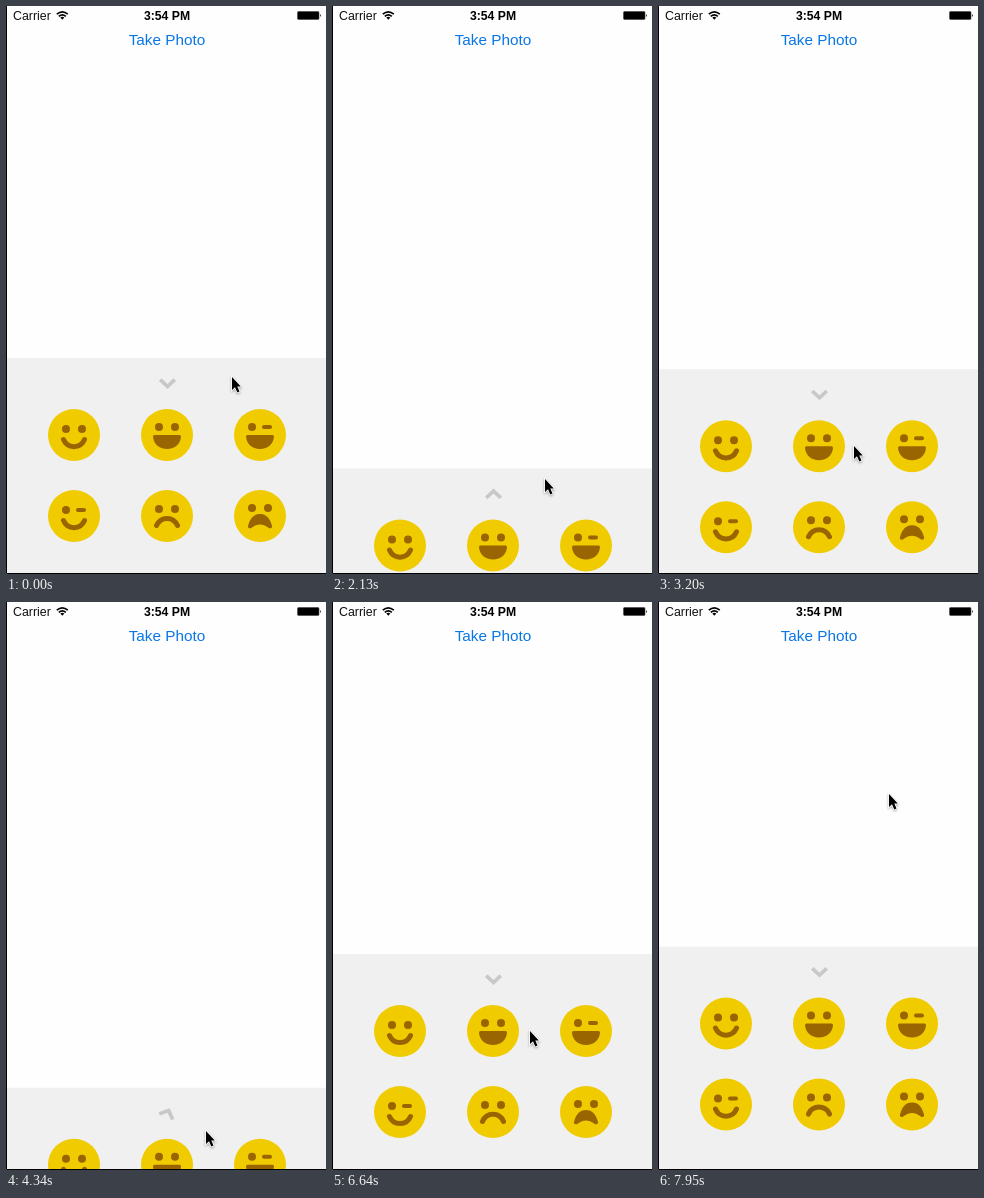
These frames come from a looping animation (320 by 568 pixels, 8 s). An HTML page:

```html
<!DOCTYPE html>
<html lang="en">
<head>
<meta charset="utf-8">
<title>Emoji tray</title>
<style>
  html, body { margin: 0; width: 100%; height: 100%; overflow: hidden; background: #fefefe; }
  svg { display: block; width: 320px; height: 568px; font-family: "Liberation Sans", Arial, sans-serif; }
  .disc { fill: #f0cb00; }
  .ink { fill: #986500; }
  .line { fill: none; stroke: #986500; stroke-width: 5; stroke-linecap: round; }
  .lid { stroke-width: 4; }
</style>
</head>
<body>
<svg viewBox="0 0 320 568">
  <defs>
    <g id="open"><circle class="ink" cx="-8" r="4"/><circle class="ink" cx="8" r="4"/></g>
    <g id="wink"><circle class="ink" cx="-8" r="4"/><path class="line lid" d="M4 0H10"/></g>
    <path id="smile" class="line" d="M-10.5 4.5C-6.5 14 6.5 14 10.5 4.5"/>
    <path id="grin" class="ink" d="M-12.500 0H12.500Q14 0 14 1.500C13.500 9 8 14 0 14S-13.500 9 -14 1.500Q-14 0 -12.500 0Z"/>
    <path id="frown" class="line" d="M-10.500 9.500C-6.500 0 6.500 0 10.500 9.500"/>
    <path id="wail" class="ink" d="M-12 10C-10 2 -6 -2 0 -2S10 2 12 10C12.500 12.500 10 13 8 11.500C3 7.500 -3 7.500 -8 11.500C-10 13 -12.500 12.500 -12 10Z"/>
  </defs>

  <rect width="320" height="568" fill="#fefefe"/>

  <text x="7" y="13.5" font-size="12.4" fill="#111">Carrier</text>
  <path d="M50.8 8.2Q56.300 3.400 61.800 8.200M52.800 10.400Q56.300 7.400 59.800 10.400" fill="none" stroke="#000" stroke-width="1.7"/>
  <path d="M56.300 13.800L54.300 11.600Q56.300 10 58.300 11.600Z"/>
  <text x="161" y="13.500" font-size="12.2" font-weight="bold" text-anchor="middle">3:54 PM</text>
  <rect x="291.500" y="5.500" width="21.500" height="8" rx="1" stroke="#444" stroke-width=".6"/>
  <path d="M314 8Q315.800 9.500 314 11Z"/>
  <text x="161" y="39" font-size="15.300" fill="#0976e6" text-anchor="middle">Take Photo</text>

  <g id="tray">
    <rect width="320" height="260" fill="#f0f0f0"/>
    <path id="chevron" d="M-7.300 3.800L0 -3L7.300 3.800" fill="none" stroke="#c8c8c8" stroke-width="3.700"/>
    <g id="faces"></g>
  </g>

  <path d="M.5 0V567.500H320" fill="none" stroke="#000"/>
  <path id="cursor" d="M1 1V14L4 11.300L6.300 16.500L8.500 15.500L6.300 10.500H9.800Z" stroke="#fff" stroke-width="1.600" paint-order="stroke" style="filter:drop-shadow(0 1px 1px #0005)"/>
</svg>
<script>
const LOOP = 8000, OPEN = 352, CLOSED = 505.5;
const [tray, chevron, faces, cursor] =
  ["tray", "chevron", "faces", "cursor"].map(id => document.getElementById(id));

// Eyes, eye height, mouth; three faces to a row
const kinds = [
  ["open", -6, "smile"], ["open", -8, "grin"], ["wink", -8, "grin"],
  ["wink", -6, "smile"], ["open", -7, "frown"], ["open", -8, "wail"]
];
faces.innerHTML = kinds.map(([eyes, eyeY, mouth], i) =>
  `<g transform="translate(${68 + i % 3 * 93} ${77 + Math.floor(i / 3) * 81})">
    <circle class="disc" r="26"/><use href="#${eyes}" y="${eyeY}"/><use href="#${mouth}"/>
  </g>`).join("");

const mix = (from, to, k) => from + (to - from) * k;
const clamp = k => Math.min(1, Math.max(0, k));
const ease = k => k * k * (3 - 2 * k);

// The pointer rests between moves
const moves = [
  { start: 30, end: 400, x: 167, y: 359 },
  { start: 400, end: 690, x: 195, y: 387 },
  { start: 1140, end: 1630, x: 212, y: 515 },
  { start: 1700, end: 2130, x: 212, y: 472 },
  { start: 2400, end: 3110, x: 195, y: 428 },
  { start: 3100, end: 3550, x: 198, y: 516 },
  { start: 4070, end: 4160, x: 199, y: 528 },
  { start: 5730, end: 6500, x: 197, y: 428 },
  { start: 6640, end: 7410, x: 226, y: 170 },
  { start: 7460, end: 7700, x: 232, y: 95 },
  { start: 7700, end: 7950, x: 230, y: 191 }
];

function pointerAt(t) {
  let x = 225, y = 370;
  for (const move of moves) {
    const k = ease(clamp((t - move.start) / (move.end - move.start)));
    x = mix(x, move.x, k);
    y = mix(y, move.y, k);
  }
  return { x, y };
}

// Each drag alternately closes and opens the tray
const drags = [
  { grab: 890, release: 890 },
  { grab: 1700, release: 2300 },
  { grab: 3100, release: 3550 },
  { grab: 4317, release: 4317 },
  { grab: 6640, release: LOOP }
];

// Underdamped step response, from 0 to 1
function spring(ms) {
  const s = ms / 1000, damping = 0.63, omega = 24;
  const root = Math.sqrt(1 - damping * damping), a = omega * root * s;
  return 1 - Math.exp(-damping * omega * s) * (Math.cos(a) + damping / root * Math.sin(a));
}

function trayAt(t) {
  const index = drags.findLastIndex(drag => t >= drag.grab);
  if (index < 0) return { top: OPEN, angle: 180 };
  const { grab, release } = drags[index];
  const wasOpen = index % 2 === 0;
  const [from, to] = wasOpen ? [OPEN, CLOSED] : [CLOSED, OPEN];
  const [fromAngle, toAngle] = wasOpen ? [180, 0] : [0, 180];

  const pull = pointerAt(Math.min(t, release)).y - pointerAt(grab).y;
  const resistance = wasOpen && pull < 0 ? 32 : 1;
  const k = spring(Math.max(0, t - release));
  return { top: mix(from + pull / resistance, to, k), angle: mix(fromAngle, toAngle, k) };
}

function draw() {
  const t = performance.now() % LOOP;
  const { x, y } = pointerAt(t);
  const { top, angle } = trayAt(t);
  tray.setAttribute("transform", `translate(0 ${top})`);
  chevron.setAttribute("transform", `translate(161.5 25.5) rotate(${angle})`);
  cursor.setAttribute("transform", `translate(${Math.round(x)} ${Math.round(y)})`);
  requestAnimationFrame(draw);
}
draw();
</script>
</body>
</html>
```
